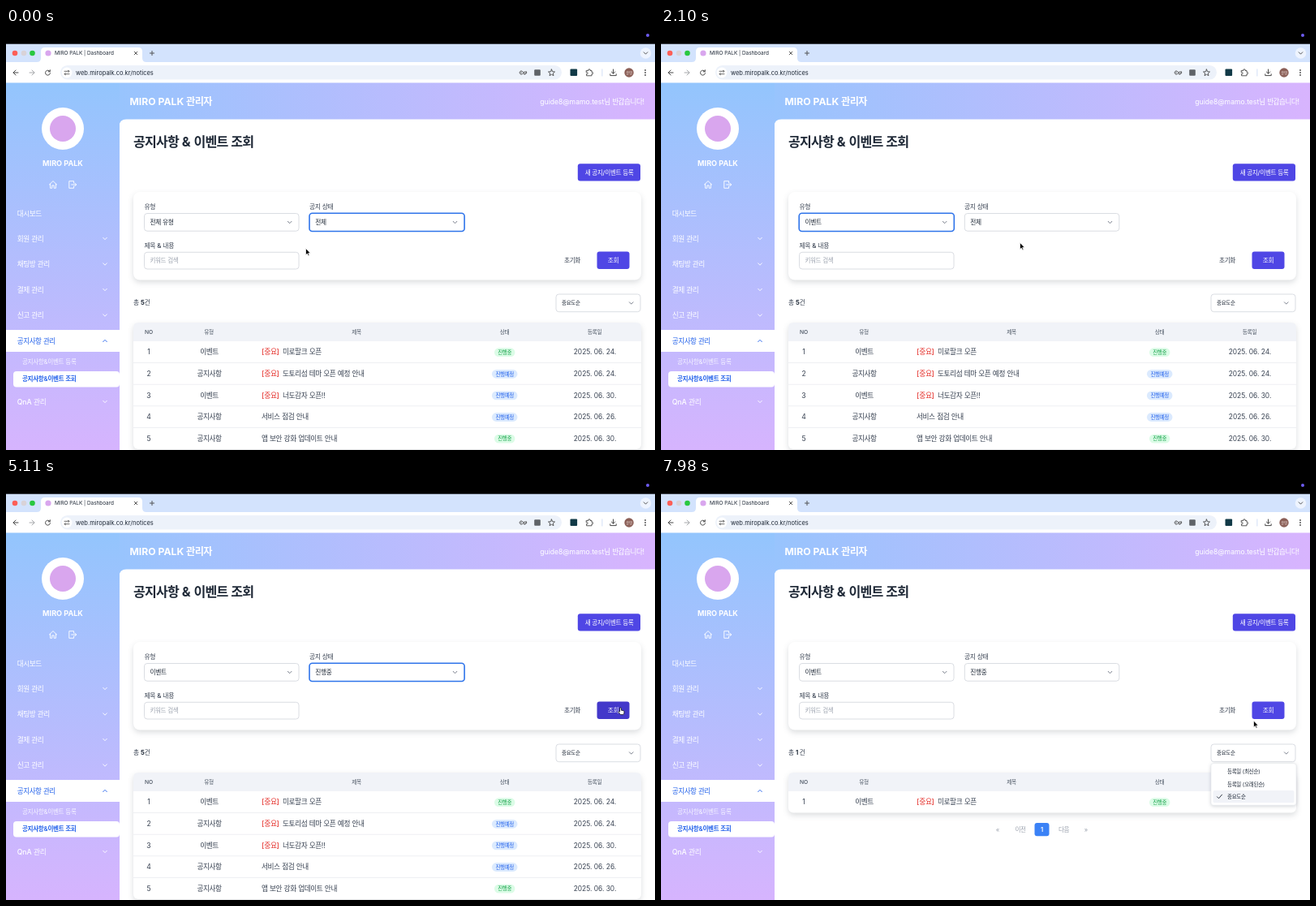
An HTML page for the animation above (8000 ms loop, 800 px wide and 520 px high).

```html
<!DOCTYPE html>
<html lang="ko">
<head>
<meta charset="utf-8">
<title>MIRO PALK | Dashboard</title>
<style>
html, body { margin: 0; width: 100%; height: 100%; overflow: hidden; background: #fff; }
svg { display: block; width: 800px; height: 520px; }
text { font-family: Inter, "Noto Sans CJK KR", "Noto Sans KR", sans-serif; white-space: pre; }
.ko { letter-spacing: -.05em; }
.card { filter: drop-shadow(0 3px 3.5px #1e293b29); }
.menu { filter: drop-shadow(0 1.5px 2px #1e293b33); }
</style>
</head>
<body>
<svg viewBox="0 0 800 520">
  <defs>
    <linearGradient id="side" x2="0" y2="1"><stop stop-color="#93c5fd"/><stop offset="1" stop-color="#d6b4fe"/></linearGradient>
    <linearGradient id="head"><stop stop-color="#98c4fd"/><stop offset="1" stop-color="#d8b4fe"/></linearGradient>
  </defs>
  <g id="base"></g>
  <g id="live"></g>
</svg>
<script>
const LOOP = 8000, STEP = 70;
const INK = '#1f2937', BODY = '#374151', MUTED = '#9ca3af', BLUE = '#2563eb', RING = '#2f74ea', INDIGO = '#4f46e5';
const $ = id => document.getElementById(id);

// Drawing helpers: y of a text is its vertical centre.
const text = (x, y, size, str, fill = BODY, weight = 400, anchor = 'start') =>
  `<text x="${x}" y="${y + size * .36}" font-size="${size}" fill="${fill}" font-weight="${weight}" text-anchor="${anchor}">` +
  str.replace(/[가-힣]+/g, '<tspan class="ko">$&</tspan>') + '</text>';
const mid = (x, y, size, str, fill, weight) => text(x, y, size, str, fill, weight, 'middle');
const rect = (x, y, w, h, fill, r = 0, extra = '') =>
  `<rect x="${x}" y="${y}" width="${w}" height="${h}" rx="${r}" fill="${fill}" ${extra}/>`;
const dot = (x, y, r, fill) => `<circle cx="${x}" cy="${y}" r="${r}" fill="${fill}"/>`;
const line = (x, y, d, color, w = 1) =>
  `<path transform="translate(${x} ${y})" d="${d}" fill="none" stroke="${color}" stroke-width="${w}" stroke-linecap="round" stroke-linejoin="round"/>`;
const chevron = (x, y, color, up = 1) => line(x, y, `M-2.3 ${-1.2 * up}L0 ${1.2 * up}L2.3 ${-1.2 * up}`, color, .9);
const check = (x, y) => line(x, y, 'M-3 .2L-1 2.2L3-2.4', INK, .9);

function browser() {
  const icon = '#474747';
  return rect(0, 0, 800, 20, '#000') + dot(791, 9, 2, '#6d5cf0') +
    rect(0, 19.7, 800, 22.3, '#d3e3fd') +
    dot(11, 31, 3.3, '#fe5f57') + dot(22, 31, 3.3, '#d9d3d8') + dot(32.5, 31, 3.3, '#28c840') +
    '<path d="M38 42q5 0 5-5v-8q0-5 5-5h115q5 0 5 5v8q0 5 5 5z" fill="#fff"/>' +
    dot(52, 31, 3.6, '#d9a6ee') + text(60, 31, 6.4, 'MIRO PALK | Dashboard', INK) +
    line(160, 31, 'M-1.8-1.8L1.8 1.8M1.8-1.8L-1.8 1.8', icon, .9) +
    line(180, 31, 'M-2.6 0H2.6M0-2.6V2.6', icon, .9) +
    dot(788.5, 31, 6.8, '#eef4ff') + chevron(788.5, 31, icon) +
    rect(0, 42, 800, 25.5, '#fff') + rect(67, 46, 618, 17.5, '#edf2fa', 8.7) +
    line(12, 55, 'M3 0H-3M0-3L-3 0L0 3', icon) +
    line(32, 55, 'M-3 0H3M0-3L3 0L0 3', '#a5a7aa') +
    line(51.5, 55, 'M2.5-1.6A3 3 0 1 0 3 .7M2.8-3.3V-1.2H.7', icon) +
    dot(75, 55, 6.4, '#fff') +
    line(75, 55, 'M-3-1.7H0M2.8-1.7A1 1 0 1 1 .8-1.7A1 1 0 1 1 2.8-1.7M3 1.7H0M-2.8 1.7A1 1 0 1 0-.8 1.7A1 1 0 1 0-2.8 1.7', icon, .8) +
    text(86, 55, 7.5, 'web.miropalk.co.kr/notices', INK) +
    line(637, 55, 'M.2-.8A2.1 2.1 0 1 0 .2.8H1.6V2H3.2V.8H4.6V-.8Z', icon, .9) + dot(635, 55, .7, icon) +
    rect(651.2, 51.2, 7.6, 7.6, '#5f6368', 1) +
    line(672.5, 55, 'M0-4L1.1-1.3L4-1L1.8.9L2.5 3.7L0 2.2L-2.5 3.7L-1.8.9L-4-1L-1.1-1.3Z', icon, .9) +
    rect(695.5, 50.5, 8.6, 8.6, '#123a47', 1) +
    line(719, 55, 'M-3.4-2.6H-1A1.1 1.1 0 1 1 1-2.6H3V-.4A1.1 1.1 0 1 1 3 1.6V3.8H-3.4V1.6A1.1 1.1 0 1 0-3.4-.4Z', icon, .9) +
    rect(734.5, 50.5, .8, 9, '#c7d7f3') +
    line(748.5, 55, 'M0-4V1M-2.2-1L0 1.2L2.2-1M-3.7 1.8V3.6H3.7V1.8', icon) +
    dot(768, 55, 5.7, '#8b5f57') + mid(768, 55, 4.4, '운영', '#f3e6e2') +
    [-3, 0, 3].map(d => dot(788, 55 + d, .9, icon)).join('');
}

function sidebar() {
  const items = [['대시보드', 228.5], ['회원 관리', 259.5], ['채팅방 관리', 291], ['결제 관리', 322.5], ['신고 관리', 354], ['QnA 관리', 460.5]];
  return rect(0, 67.5, 140, 452.5, 'url(#side)') +
    dot(70, 124, 26, '#fff') + dot(70, 124, 16, '#d9a6ee') +
    mid(70, 167, 9.1, 'MIRO PALK', '#fff', 700) +
    line(58, 193, 'M-4.6 0L0-4.4L4.6 0M-3.4-.8V4.3H-1.2V1H1.2V4.3H3.4V-.8', '#fff', .9) +
    line(82, 193, 'M1.6-2V-4.3H-4.2V4.3H1.6V2M-1.4 0H4.6M2.8-1.9L4.7 0L2.8 1.9', '#fff', .9) +
    items.map(([name, y], i) => text(13.7, y, 8.7, name, '#fff', 500) + (i ? chevron(122, y, '#fff') : '')).join('') +
    rect(0, 372, 140, 27, '#fff') + text(13.7, 385.5, 8.6, '공지사항 관리', BLUE, 500) + chevron(122, 385.5, BLUE, -1) +
    text(20, 411, 7.6, '공지사항&이벤트 등록', '#f5f3ff') +
    rect(9, 423, 131, 19.5, '#fff', 4) + text(20, 432.7, 7.6, '공지사항&이벤트 조회', BLUE, 600);
}

function page() {
  return rect(140, 67.5, 660, 60, 'url(#head)') +
    text(152.5, 90.5, 12.2, 'MIRO PALK 관리자', '#fff', 700) +
    text(787, 90.5, 8.6, 'guide8@mamo.test님 반갑습니다!', '#fff', 400, 'end') +
    '<path d="M139.5 520V121.5q0-9 9-9H800V520Z" fill="#fff"/>' +
    text(157, 140, 16.1, '공지사항 & 이벤트 조회', INK, 700) +
    rect(704.8, 167.2, 77.2, 21.4, INDIGO, 3) + mid(743.5, 178, 7.6, '새 공지/이벤트 등록', '#fff', 500) +
    rect(157, 202, 626, 108.5, '#fff', 8, 'class="card"') +
    text(170.5, 220.5, 7.8, '유형', BODY, 500) + text(374, 220.5, 7.8, '공지 상태', BODY, 500) +
    text(170.5, 268.5, 7.8, '제목 & 내용', BODY, 500) +
    rect(170.5, 276.3, 190.5, 20.7, '#fff', 3.5, 'stroke="#d1d5db" stroke-width=".8"') +
    text(177.5, 286.6, 7.5, '키워드 검색', MUTED) +
    mid(698, 286.2, 7.7, '초기화', BODY, 500);
}

const rows = [
  ['이벤트', '미로팔크 오픈', 1, 1, '24'],
  ['공지사항', '도토리섬 테마 오픈 예정 안내', 1, 0, '24'],
  ['이벤트', '너도감자 오픈!!', 1, 0, '30'],
  ['공지사항', '서비스 점검 안내', 0, 0, '26'],
  ['공지사항', '앱 보안 강화 업데이트 안내', 0, 1, '30'],
];

function badge(y, active) {
  const [w, fill, color, label] = active ? [25.5, '#dcfce7', '#16a34a', '진행중'] : [31.5, '#dbeafe', BLUE, '진행예정'];
  return rect(614.7 - w / 2, y - 5, w, 10.8, fill, 5.4) + mid(614.7, y + .4, 6.5, label, color, 500);
}

function table(count) {
  const rowH = 26.6, top = 386;
  let out = rect(157, 363, 626, 23 + rowH * count, '#fff', 6, 'class="card"') +
    '<path d="M157 386V369q0-6 6-6H777q6 0 6 6V386Z" fill="#f1f3f8"/>' +
    [['NO', 176], ['유형', 250], ['제목', 432], ['상태', 614.5], ['등록일', 725.5]]
      .map(([s, x]) => mid(x, 374.3, 6.7, s, '#4b5563', 500)).join('');
  rows.slice(0, count).forEach(([kind, title, major, active, day], i) => {
    const y = top + rowH * (i + .5);
    if (i) out += rect(157, top + rowH * i - .4, 626, .8, '#eaecf0');
    out += mid(176, y, 8.6, String(i + 1)) + mid(250.5, y, 8.7, kind) +
      (major ? text(315, y, 8.8, '[중요]', '#e5342f', 500) : '') +
      text(major ? 341 : 315, y, 8.7, title) +
      badge(y, active) +
      mid(726, y, 8.4, `2025. 06. ${day}.`);
  });
  if (count === 1) {
    out += rect(460.5, 425, 18, 16.3, '#3b82f6', 3) + mid(469.5, 433, 7.6, '1', '#fff', 600) +
      [['«', 415], ['이전', 443], ['다음', 496.5], ['»', 524]].map(([s, x]) => mid(x, 433, 7.6, s, MUTED)).join('');
  }
  return out;
}

const selects = {
  type: { x: 170.5, y: 228.5, w: 190.5, h: 21.7, size: 7.7, row: 17.3, first: 264, options: ['전체 유형', '공지사항', '이벤트'] },
  status: { x: 374.3, y: 228.5, w: 190.5, h: 21.7, size: 7.7, row: 17.3, first: 264, options: ['전체', '진행중', '종료', '진행예정'] },
  sort: { x: 678, y: 328, w: 104, h: 21.7, size: 6.5, row: 15.3, first: 362, options: ['등록일 (최신순)', '등록일 (오래된순)', '중요도순'] },
};
const button = { x: 728.5, y: 275.5, w: 40, h: 21.5 };
const inside = (p, b) => p.x >= b.x && p.x <= b.x + b.w && p.y >= b.y && p.y <= b.y + b.h;

function select(s, value, focused) {
  const grow = focused ? .3 : 0;
  const stroke = focused ? `stroke="${RING}" stroke-width="1.6"` : 'stroke="#d1d5db" stroke-width=".8"';
  return rect(s.x - grow, s.y - grow, s.w + 2 * grow, s.h + 2 * grow, '#fff', 3.5, stroke) +
    text(s.x + 7, s.y + 11, s.size, s.options[value], INK, 500) +
    chevron(s.x + s.w - 11.3, s.y + 11, '#6b7280');
}

function menu(s, value, p) {
  const n = s.options.length, top = s.y + s.h + 2;
  const item = i => ({ x: s.x + 2.5, y: s.first + s.row * i - s.row / 2, w: s.w - 4, h: s.row });
  const hover = s.options.findIndex((_, i) => inside(p, item(i)));
  const hot = item(hover < 0 ? value : hover);
  return rect(s.x, top, s.w + 1, s.first + s.row * (n - .5) + 3 - top, '#fff', 3, 'class="menu" stroke="#e5e7eb" stroke-width=".6"') +
    rect(hot.x, hot.y, hot.w, hot.h, '#f1f3f8', 2) +
    s.options.map((o, i) => text(s.x + 20, s.first + s.row * i, s.size, o, INK)).join('') +
    check(s.x + 10.5, s.first + s.row * value);
}

// Pointer path: time, x, y. Equal neighbours mean a rest.
const path = [
  [0, 369.5, 271.5], [70, 369.5, 271.5], [630, 300, 240], [980, 300, 240],
  [1330, 281.5, 291.5], [1400, 281.5, 293], [1610, 281.5, 293], [2100, 442.5, 264.5],
  [2520, 470, 240], [2660, 470, 240], [3150, 428, 281], [3640, 428, 281], [3850, 428, 281],
  [4200, 485.5, 287.5], [4340, 500, 288], [4550, 500, 288], [5110, 757.5, 283], [5670, 757.5, 283],
  [6160, 737, 339], [7770, 737, 339], [7980, 730.5, 299], [8000, 730.5, 299],
];

function slope(i, k) {
  const a = path[i - 1], b = path[i], c = path[i + 1];
  if (!a || !c || a[k] === b[k] || b[k] === c[k]) return 0;
  return (c[k] - a[k]) / (c[0] - a[0]);
}

function pointer(t) {
  const i = Math.max(0, path.findIndex(p => p[0] > t) - 1);
  const a = path[i], b = path[i + 1], span = b[0] - a[0], u = (t - a[0]) / span;
  const at = k => (1 + 2 * u) * (1 - u) ** 2 * a[k] + u * (1 - u) ** 2 * span * slope(i, k) +
    u * u * (3 - 2 * u) * b[k] + u * u * (u - 1) * span * slope(i + 1, k);
  return { x: at(1), y: at(2) };
}

const arrow = 'M0 0V8.2L1.9 6.5L3.2 9.3L4.5 8.7L3.2 6H5.7Z';
const hand = 'M-.9.9A.9.9 0 0 1 .9.9V3.2L3.7 3.8Q4.7 4.1 4.6 5.1L4.1 7.7Q3.9 8.6 3 8.6H.6Q-.1 8.6-.5 8L-2.8 5.2Q-2.3 4.1-.9 5.1Z';
const cursor = (p, link) =>
  `<path transform="translate(${p.x} ${p.y})" d="${link ? hand : arrow}" fill="${link ? '#fff' : '#000'}" ` +
  `stroke="${link ? '#000' : '#fff'}" stroke-width=".7" stroke-linejoin="round"/>`;

function scene(t) {
  const within = (a, b) => t >= a && t < b;
  const p = pointer(t);
  const value = { type: t < 1610 ? 0 : 2, status: t < 3570 ? 0 : 1, sort: 2 };
  const open = within(980, 1610) ? 'type' : within(2660, 3570) ? 'status' : t >= 6440 ? 'sort' : '';
  const focus = within(1610, 2660) ? 'type' : t < 980 || within(3570, 5250) ? 'status' : '';
  const onButton = !open && inside(p, button);
  const link = onButton || (!open && Object.values(selects).some(s => inside(p, s)));
  const count = t < 5250 ? 5 : 1;
  const ring = within(5250, 6440) ? `stroke="${BLUE}" stroke-width=".9"` : '';
  return Object.keys(selects).map(k => select(selects[k], value[k], focus === k)).join('') +
    rect(button.x, button.y, button.w, button.h, onButton ? '#4338ca' : INDIGO, 3, ring) +
    mid(748.5, 286.2, 7.7, '조회', '#fff', 500) +
    text(157, 338.7, 7.7, '총 ') +
    text(166, 338.7, 7.7, String(count), INK, 700) + text(170.7, 338.7, 7.7, '건') +
    table(count) + (open ? menu(selects[open], value[open], p) : '') + cursor(p, link);
}

$('base').innerHTML = browser() + page() + sidebar();
const start = performance.now();
let shown = -1;
function tick() {
  const t = Math.floor(((performance.now() - start) % LOOP) / STEP) * STEP;
  if (t !== shown) $('live').innerHTML = scene(shown = t);
  requestAnimationFrame(tick);
}
tick();
</script>
</body>
</html>
```
